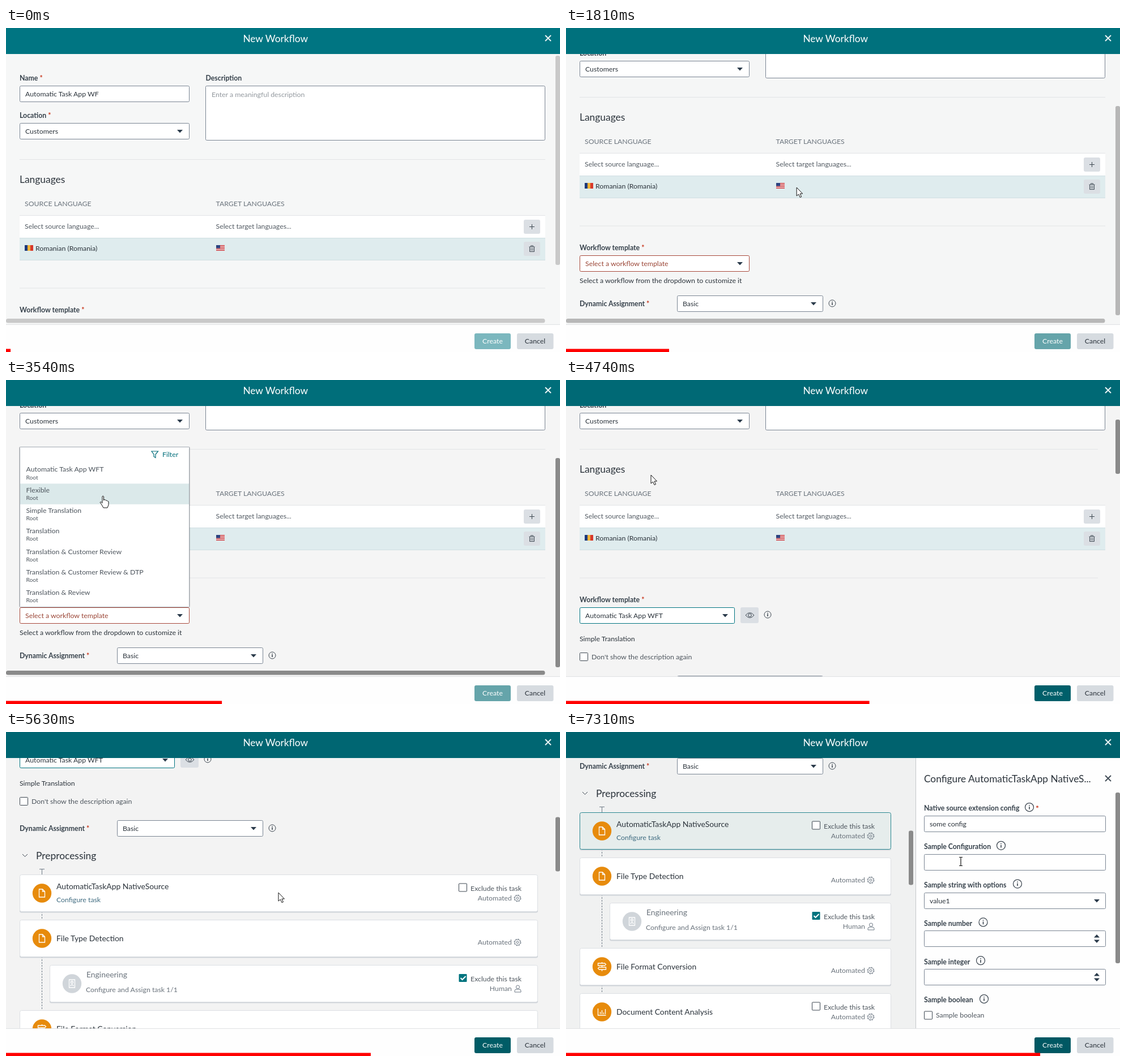
An HTML page that plays this animation: 978x573 px, repeating every 7380 ms.

```html
<!DOCTYPE html>
<html lang="en">
<head>
<meta charset="utf-8">
<title>New Workflow</title>
<style>
html, body { margin: 0; width: 100%; height: 100%; overflow: hidden; }
svg { display: block; width: 978px; height: 573px; font-family: Lato, sans-serif; fill: none; }
text { fill: #2b333b; white-space: pre; }
.b { font-weight: 700; fill: #36414b; }
.l { fill: #4d555d; }
.m { fill: #6a737c; }
.pale { fill: #92989e; }
.dim { fill: #525a62; }
.teal { fill: #006d7a; }
.light { fill: #fff; }
.end { text-anchor: end; }
.mid { text-anchor: middle; }
.link { fill: #3f6b80; }
.star { fill: #c8361c; }
.warn { fill: #9a4434; }
.box { fill: #fff; stroke: #7a8593; }
.bad { stroke: #a8483a; }
.on { stroke: #007480; }
.btn { fill: #dbdfe4; }
.ink { fill: #2b3b4b; }
.line { stroke: #3c4650; }
.soft { stroke: #6f7a86; }
.white { stroke: #fff; stroke-width: 1.3; }
.rule { stroke: #e2e4e6; }
.card { fill: #fff; stroke: #dcdfe3; width: 914px; }
.card.sub { width: 861px; }
.shade { fill: #cfd4d9; width: 915px; }
.shade.sub { width: 862px; }
.menu, .chosen, .loaded, .open { display: none; }
.is-menu .menu, .is-chosen .chosen, .is-loaded .loaded, .is-open .open { display: inline; }
.is-chosen .unchosen, .is-loaded .unloaded { display: none; }
.is-open .card { width: 549px; }
.is-open .shade { width: 550px; }
.is-open .card.sub { width: 496px; }
.is-open .shade.sub { width: 497px; }
.is-open .right { transform: translateX(-365px); }
.is-open .card.first { fill: #e6edec; stroke: #2a8791; }
</style>
</head>
<body>
<svg id="stage" viewBox="0 0 978 573"></svg>
<script>
const LOOP = 7380;
const stage = document.getElementById('stage');

// Text is placed by its optical centre line.
const text = (x, y, s, cls = '', size = 12.3) =>
  `<text x="${x}" y="${y + size * .35}" class="${cls}" font-size="${size}">${s}</text>`;
const rect = (x, y, w, h, attrs = '', r = 0) =>
  `<rect x="${x}" y="${y}" width="${w}" height="${h}" rx="${r}" ${attrs}/>`;
const path = (d, cls = 'line', attrs = '') => `<path d="${d}" class="${cls}" ${attrs}/>`;
const group = (cls, ...parts) => `<g class="${cls}">${parts.join('')}</g>`;
const at = (x, y, s) => `<g transform="translate(${x} ${y})">${s}</g>`;

const label = (x, y, s, required) =>
  text(x, y, s + (required ? '<tspan class="star"> *</tspan>' : ''), 'b');
const field = (x, y, w, s = '', cls = '', h = 28) =>
  rect(x + .5, y + .5, w, h, `class="box ${cls}"`, 2) + text(x + 10, y + 14.5, s);
const caret = (x, y) => path(`M${x - 5} ${y - 2.5}h10l-5 5.5z`, 'ink');
const select = (x, y, w, s, cls) => field(x, y, w, s, cls) + caret(x + w - 16, y + 14.5);
const info = (x, y, r = 6) =>
  `<circle cx="${x}" cy="${y}" r="${r}" class="line" stroke-width="${r / 6}"/>` +
  path(`M${x} ${y - r * .55}v1.5M${x} ${y - r * .15}v${r * .65}`, 'line', 'stroke-width="1.6"');
const check = (x, y, ticked) =>
  rect(x + .5, y - 6.5, 14, 14, ticked ? 'fill="#00747f"' : 'class="line" fill="#fff"', 1) +
  (ticked ? path(`M${x + 3.5} ${y + .5}l3 3 6-6`, '', 'stroke="#fff" stroke-width="2"') : '');
const rule = y => path(`M24 ${y}H952`, 'rule unloaded') + path(`M24 ${y}H939`, 'rule loaded');
const cross = (x, y, color) =>
  path(`M${x - 5} ${y - 5}l10 10m0-10l-10 10`, '', `stroke="${color}" stroke-width="2"`);
const gear = (x, y) =>
  `<circle cx="${x}" cy="${y}" r="5" class="soft"/><circle cx="${x}" cy="${y}" r="2" class="soft"/>` +
  `<circle cx="${x}" cy="${y}" r="6" class="soft" stroke-dasharray="2.3 2.41"/>`;
const person = (x, y) => at(x, y,
  '<circle cy="-3" r="3" class="soft"/>' + path('M-5.5 6v-2q0-3 3-3h5q3 0 3 3v2z', 'soft'));

const glyphs = {
  file: 'M-5-7h6l4 4v10h-10zM1-7v4h4',
  badge: 'M-5-7h10v14h-10zM-2-2.5a2 2 0 1 0 4 0a2 2 0 1 0-4 0M-3 4q3-4 6 0',
  signs: 'M-7-6h12l2 2-2 2h-12zM7 1h-12l-2 2 2 2h12zM0-8v2M0-2v3M0 5v3',
  chart: 'M-7-6v12h14M-3 4v-4M0 4v-7M3 4v-3M6 4v-9',
};

function card(y, { title, icon, link, sub, exclude, kind = 'Automated' }, i) {
  const x = sub ? 77 : 24, cls = sub ? 'sub' : i ? '' : 'first';
  const ty = sub ? 17.5 : link ? 21.5 : 33;
  const ky = exclude ? 42 : 40;
  const who = kind === 'Human' ? person(903.5, ky) : gear(903, ky);
  return at(0, y,
    rect(x, 4, 915, 63.5, `class="shade ${cls}"`, 3) +
    rect(x + .5, .5, 914, 65, `class="card ${cls}"`, 3) +
    `<circle cx="${x + 39.5}" cy="33" r="16.7" fill="${sub ? '#d0d5da' : '#e78b0c'}"/>` +
    at(x + 39.5, 33, path(glyphs[icon], 'white')) +
    text(x + 65, ty, title, sub ? 'm' : '', 13.9) +
    (link ? text(89, 44.5, 'Configure task', 'link') : '') +
    (sub ? text(141, 44, 'Configure and Assign task', 'm') + text(283, 44, '1/1', 'm') : '') +
    group('right',
      exclude ? check(799, 22.5, exclude === 'yes') + text(910, 24.5, 'Exclude this task', 'l end') : '',
      text(893, ky, kind, 'm end'), who));
}

const tasks = [
  { title: 'AutomaticTaskApp NativeSource', icon: 'file', link: true, exclude: 'no' },
  { title: 'File Type Detection', icon: 'file' },
  { title: 'Engineering', icon: 'badge', sub: true, exclude: 'yes', kind: 'Human' },
  { title: 'File Format Conversion', icon: 'signs' },
  { title: 'Document Content Analysis', icon: 'chart', exclude: 'no' },
];

const romania = ['#1d3a7a', '#f2b236', '#d8392b']
  .map((c, i) => rect(33 + i * 5, 384, 5, 10, `fill="${c}"`)).join('');
const usa = rect(371, 384, 15, 10, 'fill="#f3e9e9"') +
  [0, 1, 2, 3].map(i => rect(371, 384 + i * 2.8, 15, 1.5, 'fill="#cf3a3f"')).join('') +
  rect(371, 384, 7, 5.5, 'fill="#2d4380"');

const form = [
  label(24, 89, 'Name', true), field(24, 102, 299, 'Automatic Task App WF'),
  label(24, 155, 'Location', true), select(24, 168, 299, 'Customers'),
  label(352.5, 89, 'Description'), field(352, 102, 599, '', '', 96),
  text(363, 118, 'Enter a meaningful description', 'pale'),
  rule(232.5), text(24, 268, 'Languages', '', 17.4),
  text(33, 311, 'SOURCE LANGUAGE', 'm'), text(370.5, 311, 'TARGET LANGUAGES', 'm'),
  rect(24, 331, 928, 40, 'fill="#fff"'), rect(24, 371, 928, 40, 'fill="#dfecee"'),
  path('M24 331.5H952', 'rule'), path('M24 371.5H952M24 410.5H952', '', 'stroke="#d0dfe2"'),
  text(33, 351, 'Select source language...', 'dim'),
  text(370.5, 351, 'Select target languages...', 'dim'),
  romania, text(52, 390, 'Romanian (Romania)'), usa,
  rect(914, 339, 29, 25, 'class="btn"', 3), path('M924 351.5h9M928.5 347v9'),
  rect(914, 378, 29, 25, 'class="btn"', 3),
  path('M923.5 387h10M926.5 386.5v-1.5h4v1.5M924.5 387.5v8h8v-8M927 389v5M930 389v5'),
  rule(460), label(24, 499, 'Workflow template', true),
].join('');

const unchosen = group('unchosen',
  select(24, 512, 299, '<tspan class="warn">Select a workflow template</tspan>', 'bad'),
  text(24, 556.5, 'Select a workflow from the dropdown to customize it'),
  label(24, 597.5, 'Dynamic Assignment', true), select(196, 583, 257, 'Basic'), info(470, 597));

const chosen = group('chosen',
  select(24, 512, 273, 'Automatic Task App WFT', 'on'),
  rect(308, 512, 32, 28, 'class="btn"', 3),
  path('M317 526q7.5-9 15 0q-7.5 9-15 0z'), '<circle cx="324.5" cy="526" r="2.8" class="line"/>',
  info(356, 525), text(24, 567.5, 'Simple Translation'),
  check(24, 599), text(45, 599.5, "Don't show the description again", 'l'),
  label(24, 647.5, 'Dynamic Assignment', true), select(196, 633, 257, 'Basic'), info(470, 647));

const taskList = group('loaded',
  path('M29 693l4.5 4.5 4.5-4.5'), text(53, 696, 'Preprocessing', '', 17.4),
  path('M59 719.5h9M63.5 720v9', 'soft'),
  path('M63.5 729V1130', 'soft', 'stroke-dasharray="3 2"'),
  ...tasks.map((t, i) => card(729 + 80 * i, t, i)));

const templates = ['Automatic Task App WFT', 'Flexible', 'Simple Translation', 'Translation',
  'Translation &amp; Customer Review', 'Translation &amp; Customer Review &amp; DTP',
  'Translation &amp; Review'];
const menu = group('menu',
  rect(23, 228, 302, 284, 'fill="#00000030"', 2),
  rect(24.5, 228.5, 299, 283, 'fill="#fff" stroke="#a3abb3"', 1),
  rect(25, 293, 298, 36.5, 'id="hover" fill="#dbe9ea"'),
  path('M257 236h11.5l-4.5 5.5v6l-3-2v-4z', '', 'stroke="#006d7a" stroke-width="1.2"'),
  text(276, 242, 'Filter', 'teal'),
  ...templates.map((name, i) =>
    text(35.5, 268 + 36.3 * i, name, 'l') + text(35.5, 282 + 36.3 * i, 'Root', 'l', 10.2)));

const spin = y => path(`M932 ${y - 2}h10l-5-5.5zM932 ${y + 2}h10l-5 5.5z`, 'ink');
const options = [
  ['Native source extension config', 818, 'some config'], ['Sample Configuration', 768, ''],
  ['Sample string with options', 797, 'value1'], ['Sample number', 736.5, ''],
  ['Sample integer', 732, ''], ['Sample boolean', 738],
].map(([name, ix, value], i) => {
  const y = 135 + 67.8 * i, top = Math.round(y + 13);
  return label(632, y, name) + info(ix, y - 2, 7.5) +
    (i === 0 ? text(829, y, '*', 'b star', 14) : '') +
    (i === 5 ? check(632, 500.5) + text(653, 501, name, 'l') : field(632, top, 320, value)) +
    (i === 2 ? caret(937, top + 14.5) : i === 3 || i === 4 ? spin(top + 14.5) : '');
});
const panel = group('open',
  rect(617, 46, 361, 479, 'fill="#fefefe"'), path('M617.5 46V524', '', 'stroke="#c4c7ca"'),
  text(632, 83, 'Configure AutomaticTaskApp NativeS...', '', 17.3), cross(957, 82, '#46505a'),
  ...options, rect(970, 107, 8, 302, 'fill="#8a8a8a"', 3));

const cursors = {
  arrow: '<path d="M0 0v15l3.5-3 2.5 5.5 2.5-1-2.5-5.5h4.5z" fill="#fff" stroke="#111"/>',
  beam: path('M-3-7.5h2.5l.5.5.5-.5h2.5M0-7V7M-3 7.5h2.5l.5-.5.5.5h2.5', '', 'stroke="#111" stroke-width="1.2"'),
  hand: '<path d="M-1 1q1-2 2.5 0v7l1-1.5 2 .5 1 1 2 .3 1 1 1.5.7v6l-2 5h-7l-4-7-2-2.5q1-2 3 0l1 1z" fill="#fff" stroke="#111"/>',
};

stage.innerHTML = [
  rect(0, 0, 978, 573, 'id="ground"'),
  `<g id="page">${form}${unchosen}${chosen}${taskList}${menu}</g>`,
  rect(0, 512, 970, 13, 'id="gutter" class="unloaded"'),
  rect(0, 514, 951.5, 7.5, 'id="hbar" class="unloaded"', 3.5),
  rect(970, 49, 8, 370, 'id="vbar"', 3),
  panel,
  rect(0, 0, 978, 46, 'id="head"'),
  text(475.7, 19, 'New Workflow', 'mid light', 17.3), cross(957, 18, '#e8f3f4'),
  rect(0, 524, 978, 49, 'fill="#fefefe"'), path('M0 524.5H978', '', 'stroke="#dfe1e3"'),
  rect(827, 540, 64, 28, 'id="create"', 3), text(859, 553.5, 'Create', 'mid light'),
  rect(902, 540, 64.5, 28, 'fill="#d6dbe0"', 3), text(934, 553.5, 'Cancel', 'mid'),
  rect(0, 567.5, 8, 5.5, 'id="bar" fill="#f00"'),
  '<g id="cursor"></g>',
].join('');

const [ground, page, hover, gutter, hbar, vbar, head, create, bar, cursor] =
  ['ground', 'page', 'hover', 'gutter', 'hbar', 'vbar', 'head', 'create', 'bar', 'cursor']
    .map(id => document.getElementById(id));

const linear = p => p;
const smooth = p => p * p * (3 - 2 * p);

// Value of a keyed track [time, value...] at time t.
function track(keys, t, ease = smooth) {
  const n = keys.findIndex(k => k[0] > t);
  if (n === 0) return keys[0].slice(1);
  if (n < 0) return keys[keys.length - 1].slice(1);
  const a = keys[n - 1], b = keys[n];
  const p = ease((t - a[0]) / (b[0] - a[0]));
  return a.slice(1).map((v, i) => v + (b[i + 1] - v) * p);
}

const progress = [[0, 8], [1320, 124], [2370, 248], [3540, 381], [5280, 605], [6470, 737], [7310, 837], [7380, 845]];
const scroll = [[1600, 0], [1810, 110], [4740, 110], [5100, 402], [5500, 402], [5800, 587]];
const pointer = [[400, 560, 573], [1320, 442, 243], [1600, 442, 243], [2300, 282, 422], [2500, 282, 422],
  [3200, 180, 300], [3540, 171, 205], [3850, 150, 168], [4740, 150, 168], [5200, 512, 293],
  [5500, 512, 293], [6250, 128, 183], [6680, 128, 183], [7280, 697, 229]];
const shapes = [[0, 'arrow'], [2200, 'beam'], [2540, 'hand'], [4050, 'arrow'], [6220, 'hand'], [6750, 'arrow'], [7150, 'beam']];
const greys = [[0, 201], [1320, 187], [2370, 178], [3540, 138]];
const heads = [[0, 0, 117, 130], [2370, 0, 112, 124], [7310, 0, 98, 110]];
const grounds = [[0, 246, 247, 247], [5280, 244, 244, 244], [6470, 240, 241, 241]];
const faded = [[0, 123, 183, 190], [1320, 101, 164, 170]];
const rgb = c => `rgb(${c.map(Math.round)})`;
const set = (el, attrs) => { for (const k in attrs) el.setAttribute(k, attrs[k]); };

let shape;
function draw(t) {
  const menuOpen = t >= 2540 && t < 4050, picked = t >= 4050;
  const loaded = t >= 4740, open = t >= 6680;
  stage.setAttribute('class', [menuOpen && 'is-menu', picked && 'is-chosen',
    loaded && 'is-loaded', open && 'is-open'].filter(Boolean).join(' '));

  const [s] = track(scroll, t), [x, y] = track(pointer, t);
  const grey = rgb(Array(3).fill(track(greys, t)[0]));
  const back = rgb(track(grounds, t));
  set(page, { transform: `translate(0 ${-Math.round(s)})` });
  set(hbar, { fill: grey });
  set(vbar, {
    fill: grey, x: open ? 605 : 970,
    y: loaded ? 46 + s * .219 : 49 + s * .81, height: loaded ? 96 : 370,
  });

  const row = Math.floor((y - 147) / 36.3);
  set(hover, { y: 257 + 36.3 * row, visibility: row >= 0 && row < 7 ? 'inherit' : 'hidden' });

  set(head, { fill: rgb(track(heads, t)) });
  set(ground, { fill: back });
  set(gutter, { fill: back });
  set(create, { fill: rgb(picked ? track(heads, t).map(v => v * .9) : track(faded, t)) });
  set(bar, { width: track(progress, t, linear)[0] });

  const kind = shapes.filter(k => k[0] <= t).pop()[1];
  if (kind !== shape) cursor.innerHTML = cursors[shape = kind];
  set(cursor, { transform: `translate(${x} ${y})`, visibility: t < 400 ? 'hidden' : 'visible' });
}

const start = performance.now();
function tick() {
  draw((performance.now() - start) % LOOP);
  requestAnimationFrame(tick);
}
tick();
</script>
</body>
</html>
```
